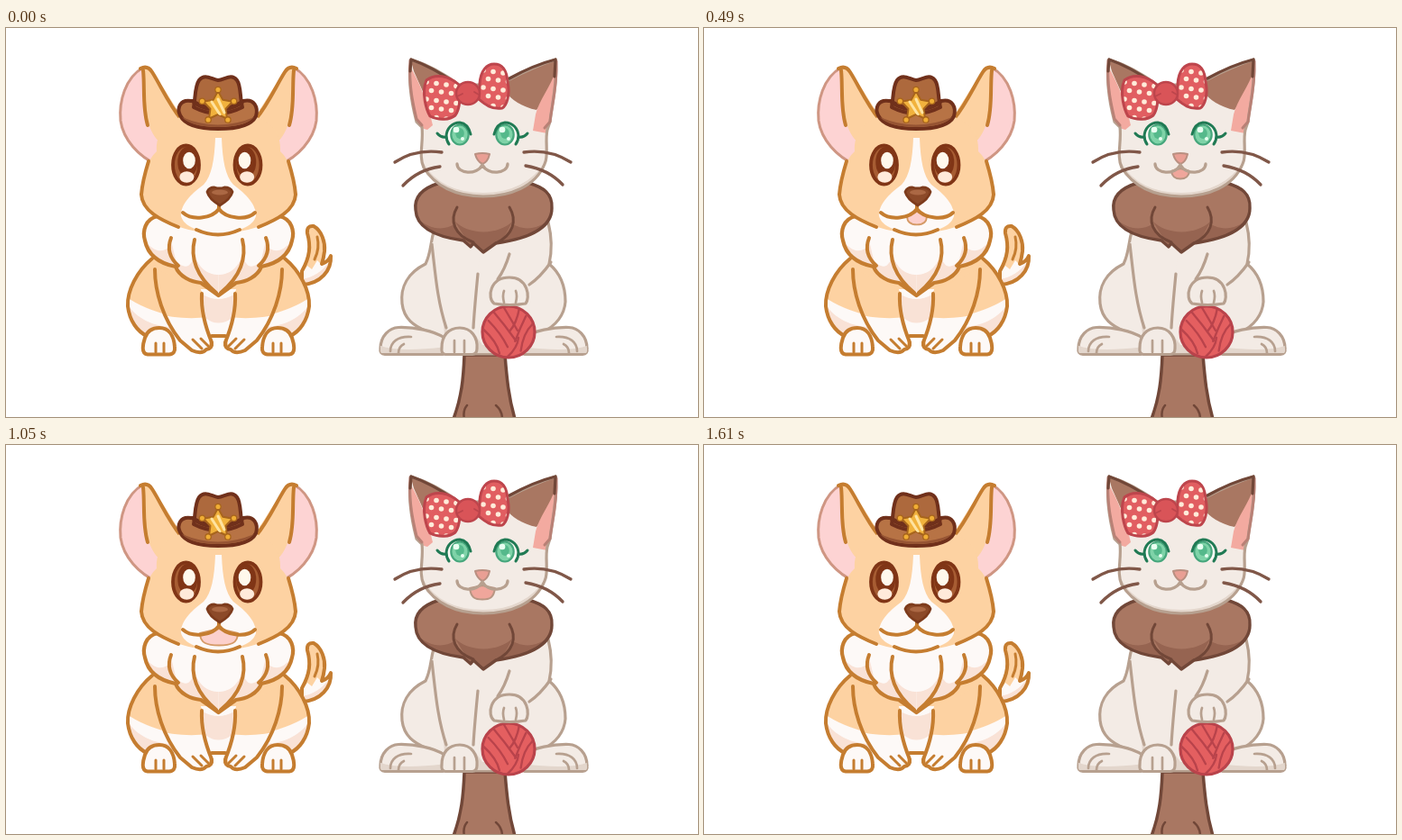
An HTML page with a canvas for the animation above (1.68 s loop, 767 by 432 pixels).

```html
<!DOCTYPE html>
<html lang="en">
<head>
<meta charset="utf-8">
<title>Talking pets</title>
<style>
html, body { margin: 0; width: 100%; height: 100%; overflow: hidden; background: #fff; }
canvas { display: block; width: 767px; height: 432px; }
</style>
</head>
<body>
<canvas id="stage" width="767" height="432"></canvas>
<script>
const ctx = document.getElementById('stage').getContext('2d');
const LOOP = 1680;
const DOG_X = 235.5, CAT_X = 528;
const DOG = { line: '#c57d30', fur: '#fdd2a2', white: '#fdf9f7', shade: '#f9e2d6', pink: '#fdd3d3', eye: '#803516' };
const CAT = { line: '#b7a08f', fur: '#f3ebe5', shade: '#e3d6cc', pink: '#f3aaa0', brown: '#a97762', dark: '#714738' };
const RED = { fill: '#e15e61', line: '#bd454c' };

// [start in ms, how far the mouths are open]
const speech = [
  [0, 0], [70, .2], [140, .36], [210, .5], [280, .62], [490, .52], [560, .4],
  [700, .44], [770, .6], [910, .8], [980, .9], [1050, 1], [1120, .95], [1190, .85],
  [1260, .74], [1330, .6], [1400, .48], [1470, .34], [1540, .18], [1610, 0]
];

function fill(d, color) {
  ctx.fillStyle = color;
  ctx.fill(new Path2D(d));
}
function line(d, color, width) {
  ctx.strokeStyle = color;
  ctx.lineWidth = width;
  ctx.stroke(new Path2D(d));
}
function shape(d, color, edge, width) {
  fill(d, color);
  line(d, edge, width);
}
function oval(x, y, rx, ry, color, edge, width) {
  ctx.beginPath();
  ctx.ellipse(x, y, rx, ry, 0, 0, Math.PI * 2);
  ctx.fillStyle = color;
  ctx.fill();
  if (edge) {
    ctx.strokeStyle = edge;
    ctx.lineWidth = width;
    ctx.stroke();
  }
}
function clipped(d, draw) {
  ctx.save();
  ctx.clip(new Path2D(d));
  draw();
  ctx.restore();
}
function bothSides(axis, draw) {
  draw();
  ctx.save();
  ctx.translate(2 * axis, 0);
  ctx.scale(-1, 1);
  draw();
  ctx.restore();
}

function dogTail() {
  const tail = 'M328 270C337 254 338 242 334 228Q333 219 341 220C350 225 354 238 353 248Q352 256 350 262Q357 260 360 253C361 269 349 284 328 285Z';
  fill(tail, DOG.fur);
  clipped(tail, () => {
    fill('M325 276L334 264L339 268L345 258L350 263L362 248V292H320Z', DOG.white);
    fill('M324 279C338 279 350 271 359 259L362 290H320Z', DOG.shade);
  });
  line(tail, DOG.line, 4);
  line('M345 232Q348 245 342 257', DOG.line, 3);
}

function dogBody() {
  fill('M164 250H307L310 330L252 343H219L162 330Z', DOG.fur);
  fill('M216 290H255L252 343H220Z', DOG.white);
  fill('M218 296Q235 306 253 296L251 322Q235 333 221 322Z', DOG.shade);
  bothSides(DOG_X, () => {
    const thigh = 'M164 256C145 270 134 292 135 309C137 326 146 337 157 342L192 338C178 316 168 295 166 266Z';
    fill(thigh, DOG.fur);
    clipped(thigh, () => {
      fill('M130 296Q148 311 184 320V350H130Z', DOG.white);
      fill('M130 300C142 322 163 334 195 332V350H130Z', DOG.shade);
    });
    line('M162 256C145 270 134 292 135 309C137 326 146 337 156 342', DOG.line, 4);
    shape('M157 362.5C149 362 152 350 154 344C157 335 163 333 170 333C180 333 186 341 187 354Q188 362 181 362.5Z', DOG.white, DOG.line, 4);
    line('M166 350V360M175 350V360', DOG.line, 3);
    const leg = 'M164 266C165 293 174 323 193 347L206 358Q217 363 222 357Q229 356 228 349C221 332 216 315 217 292Z';
    fill(leg, DOG.fur);
    clipped(leg, () => fill('M160 315Q190 325 225 321V368H160Z', DOG.white));
    line('M165 268C165 293 174 323 193 347L206 358Q217 363 222 357Q229 356 228 349C221 332 216 315 217 295', DOG.line, 4);
    line('M207 346L217 356M216 345L224 353', DOG.line, 3);
  });
  line('M228 342H243', DOG.line, 4);
}

function dogRuff() {
  const edge = 'M168 209C154 212 151 226 154 236C157 251 168 261 188 265C192 276 205 282 216 283L235.5 297L255 283C266 282 279 276 283 265C303 261 314 251 317 236C320 226 317 212 303 209Z';
  fill(edge, DOG.white);
  clipped(edge, () => bothSides(DOG_X, () => {
    fill('M151 232C163 249 174 252 184 240L191 270H148Z', DOG.shade);
    fill('M184 254C199 272 206 265 209 250L220 286H186Z', DOG.shade);
    fill('M208 250C214 269 226 274 235.5 274V299L215 282Z', DOG.shade);
  }));
  line(edge, DOG.line, 4.2);
  bothSides(DOG_X, () => {
    line('M209 235C204 255 211 276 233 294', DOG.line, 4);
    line('M183 233C178 246 182 256 191 264', DOG.line, 4);
  });
}

function dogEye(x, glint) {
  oval(x, 152, 14.5, 21.5, '#a75d33', DOG.eye, 3.8);
  oval(x + glint / 2, 149, 11, 17, DOG.eye);
  oval(x + glint, 147, 6.8, 9.3, '#fff8ec');
  oval(x + glint / 4, 165.5, 8, 6.2, '#ffeada');
}

function dogHead() {
  bothSides(DOG_X, () => {
    shape('M152 44C132 55 125 82 127 103C130 124 147 143 168 152L176 118Z', DOG.pink, '#cf9683', 3);
    shape('M152 45C164 43 180 80 196 100L182 135L168 124C154 108 151 73 153 48Z', DOG.fur, DOG.fur, 1);
    line('M149 45Q157 41 162 49C171 63 180 84 194 101', DOG.line, 4);
    line('M152 47C154 66 151 88 157 108', DOG.line, 4);
  });
  fill('M193 99C176 105 166 117 167 137C156 147 153 163 150 184C151 202 171 213 192 221Q235 235 279 221C300 213 320 202 321 184C318 163 315 147 304 137C305 117 295 105 278 99Z', DOG.fur);
  fill('M232 122C231 147 228 164 219 174C205 184 193 197 194 209C197 219 208 225 235.5 229C263 225 274 219 277 209C278 197 266 184 252 174C243 164 240 147 239 122Z', DOG.white);
  bothSides(DOG_X, () => line('M158 148C154 161 151 171 150 185C151 203 171 213 191 221', DOG.line, 4));
  dogEye(199.5, 3.5);
  dogEye(268, -3.5);
  line('M211 224Q235 235 259 224', DOG.line, 4);
}

function dogMouth(open) {
  if (open) {
    const w = 21 * open, bottom = 214 + 8.5 * open;
    shape(`M${236 - w} 209L236 204L${236 + w} 209C${236 + w} ${bottom - 2} ${236 + w * .6} ${bottom} 236 ${bottom}C${236 - w * .6} ${bottom} ${236 - w} ${bottom - 2} ${236 - w} 209Z`, '#fcd0cc', '#d59a66', 1.8);
  }
  line('M196 205C206 214 228 212 236 201C244 212 267 214 276 205M236 195V201', DOG.line, 4);
  const nose = 'M223 182Q225 177 231 177Q237 179 242 177Q249 177 251 182Q249 190 237 197Q225 190 223 182Z';
  shape(nose, '#8c4a29', '#7d3b1c', 2.8);
  oval(237, 182.5, 9, 3, '#ab6844');
}

function hat() {
  const edge = '#70301b';
  shape('M205 81C193 79 189 89 193 97C199 109 216 112 235 112C255 112 272 108 277 98C280 88 275 78 263 81Z', '#b77345', edge, 4);
  fill('M195 99Q235 116 275 99Q265 110 235 110Q205 110 195 99Z', '#965433');
  shape('M208 88C210 78 209 65 214 58C220 50 228 57 235 58C243 57 250 50 256 58C261 65 259 78 262 88Q235 102 208 88Z', '#ad693d', edge, 4);
  line('M209 83Q235 98 261 83', edge, 5);
  const tip = (i, r) => {
    const a = -Math.PI / 2 + i * Math.PI / 5;
    return [235 + r * Math.cos(a), 87 + r * Math.sin(a)];
  };
  const star = 'M' + Array.from({ length: 10 }, (_, i) => tip(i, i % 2 ? 9 : 17).join(' ')).join('L') + 'Z';
  shape(star, '#f1b23d', '#a8651c', 2);
  clipped(star, () => line('M228 82L237 96M235 79L242 94', '#ffe3a0', 3));
  for (let i = 0; i < 10; i += 2) oval(...tip(i, 18.5), 3.2, 3.2, '#f0ad35', '#a8651c', 1.3);
}

function catBody() {
  shape('M508 363C507 389 505 410 496 434H564C557 410 555 388 553 363Z', CAT.brown, CAT.dark, 3.5);
  line('M511 419Q506 425 508 434M543 419Q550 425 550 434', CAT.dark, 2.5);

  shape('M474 226C470 241 471 250 465 262C445 272 437 288 439 306C441 323 452 331 467 337L482 362H594L594 338C610 331 619 318 620 304C620 287 614 272 602 262Q607 240 601 216Z', CAT.fur, CAT.line, 3.2);
  fill('M484 319L488 361H594V352H528L518 338Z', CAT.shade);
  bothSides(529.5, () => {
    const foot = 'M484 362.5H420Q414 362 415 356C415 342 425 333 435 332.5C453 332 474 336 486 344Z';
    shape(foot, CAT.fur, CAT.line, 3.2);
    clipped(foot, () => fill('M411 351Q430 361 488 354V361H411Z', CAT.shade));
    line('M449 343C434 342 426 349 426 359M441 351Q435 354 435 361', CAT.line, 2.7);
  });
  fill('M472 238C476 274 478 303 488 335H518C519 310 521 285 527 238Z', CAT.fur);
  line('M472 240C476 274 478 303 488 333M523 273C521 294 519 314 518 333', CAT.line, 3.2);
  shape('M487 362.5Q482 362 483 355C483 342 490 333 503 333C516 333 523 344 522 356Q522 362 517 362.5Z', CAT.fur, CAT.line, 3.2);
  line('M497 347V360M508 347V360', CAT.line, 2.7);

  yarn();
  line('M558 251Q553 268 545 279M604 260Q592 277 580 285', CAT.line, 3.2);
  shape('M541 306C533 300 536 277 558 277C579 277 581 300 576 306Q558 309 541 306Z', CAT.fur, CAT.line, 3.2);
  line('M552 292Q550 297 552 305M565 292Q567 297 565 305', CAT.line, 2.7);
}

function yarn() {
  oval(557, 337.5, 29, 28.5, '#e45f60', '#b9434b', 3.2);
  ctx.save();
  ctx.beginPath();
  ctx.arc(557, 337.5, 29, 0, Math.PI * 2);
  ctx.clip();
  for (let i = 0; i < 3; i++) {
    const s = i * 9;
    line(`M${541 - s * .7} ${316 + s}Q${553 - s * .5} ${330 + s} ${565 - s} ${347 + s * .8}`, '#b9434b', 2.4);
    line(`M${569 + s * .8} ${311 + s}Q${566 + s * .4} ${328 + s * .6} ${558 + s * .7} ${337 + s * 1.2}`, '#b9434b', 2.4);
  }
  line('M551 309L567 336M556 365Q567 355 568 344', '#b9434b', 2.4);
  ctx.restore();
}

function catRuff() {
  const edge = 'M481 172C464 177 452 186 454 202C455 222 477 232 507 236L515 243L518 239L529 249L543 239C579 234 605 222 605 200C606 184 596 177 579 172Z';
  fill(edge, CAT.brown);
  clipped(edge, () => {
    fill('M452 208C469 225 485 225 497 218L514 244H452Z', '#966451');
    fill('M608 208C590 225 574 225 562 218L544 244H608Z', '#966451');
    fill('M497 214C511 230 546 231 562 214L548 240L529 250L512 238Z', '#966451');
  });
  line(edge, CAT.dark, 3.4);
  line('M500 199C491 214 497 230 518 238M558 199C567 214 562 230 543 239', CAT.dark, 3);
}

function catEye(x) {
  oval(501, 118, 13, 12, '#fdfaf5');
  oval(x, 118.5, 9.7, 11, '#7fd3a8', '#46a67c', 2.2);
  oval(x, 117, 4.8, 6, '#55b98b');
}

function catHead() {
  const head = 'M449 35C468 41 486 51 502 63H524L558 57Q585 43 609 35C612 57 605 85 603 104L600 113C597 126 602 142 597 151C587 176 559 187 529 187C498 187 475 175 463 155C457 142 463 127 461 110L455 104C450 85 445 59 449 35Z';
  fill(head, CAT.fur);
  clipped(head, () => {
    fill('M448 33L503 63L468 84L452 48Z', CAT.brown);
    fill('M553 56L611 33L606 66L588 91C573 88 559 80 553 69Z', CAT.brown);
    fill('M445 38C458 58 467 82 473 108L467 113L445 107Z', CAT.pink);
    fill('M612 38C607 62 591 79 587 96L584 114L600 117L612 90Z', CAT.pink);
    line('M461 151C475 175 500 185 529 185C561 185 585 172 599 150', CAT.shade, 4);
  });
  line(head, CAT.line, 3.2);
  line('M448 36C446 62 451 84 455 101L461 108M610 37C611 65 605 86 603 104L597 111', '#b98176', 3);
  line('M498 61Q472 43 449 35L448 48M558 56Q585 41 609 35L608 54', CAT.dark, 3.2);
  line('M483 138Q454 134 431 149M481 154Q457 157 440 175M574 138Q602 134 626 149M576 153Q601 157 617 174', '#805748', 3.3);
  bothSides(CAT_X, () => catEye(503));
  bothSides(CAT_X, () => line('M478 117Q482 122 488 121C488 111 495 105 503 105Q512 106 515 118M488 119Q488 125 491 129', '#207a54', 3));
  [502, 553].forEach(x => {
    oval(x - 3, 113, 3.4, 3.2, '#e8fff1');
    oval(x + 4, 123, 2, 2, '#e8fff1');
  });
  shape('M520 140Q528 138 536 140Q534 149 528 151Q522 148 520 140Z', '#e99f94', '#b98f80', 2);
}

function catMouth(open) {
  if (open) {
    const w = 14 * Math.sqrt(open), bottom = 163 + 8.5 * open;
    shape(`M${528 - w} 159L528 156L${528 + w} 159C${528 + w * .9} ${bottom - 2} ${528 + w * .6} ${bottom} 528 ${bottom}C${528 - w * .6} ${bottom} ${528 - w * .9} ${bottom - 2} ${528 - w} 159Z`, '#f0a69b', '#b89582', 2);
  }
  line('M500 151C500 162 522 164 528 152C534 164 556 162 556 151', CAT.line, 3.3);
}

function bow() {
  const loops = [
    ['M502 63C491 53 476 50 466 58C460 72 466 91 470 98C480 103 492 102 498 97C504 88 503 78 502 63Z', 466, 60],
    ['M525 62C526 47 533 40 541 40C551 40 555 47 556 60C559 74 555 86 550 89C538 91 530 84 524 79Z', 529, 47]
  ];
  loops.forEach(([d, left, top]) => {
    fill(d, RED.fill);
    clipped(d, () => {
      for (let row = 0; row < 5; row++) {
        for (let col = 0; col < 4; col++) {
          oval(left + col * 11 + (row % 2) * 5.5, top + row * 9.5 + col * 1.5, 2.8, 2.8, '#ffebd9');
        }
      }
    });
    line(d, RED.line, 3);
  });
  oval(512, 72.5, 13, 12.5, '#d95458', RED.line, 2.5);
  line('M500 76L506 73M524 74L519 71', RED.line, 1.8);
}

function draw(now) {
  const time = now % LOOP;
  const open = speech.findLast(([start]) => start <= time)[1];
  ctx.fillStyle = '#fff';
  ctx.fillRect(0, 0, 767, 432);
  ctx.lineCap = ctx.lineJoin = 'round';
  dogTail();
  dogBody();
  dogRuff();
  dogHead();
  dogMouth(open);
  hat();
  catBody();
  catRuff();
  catHead();
  catMouth(open);
  bow();
}

const begun = performance.now();
function tick() {
  draw(Math.max(0, performance.now() - begun));
  requestAnimationFrame(tick);
}
tick();
</script>
</body>
</html>
```
